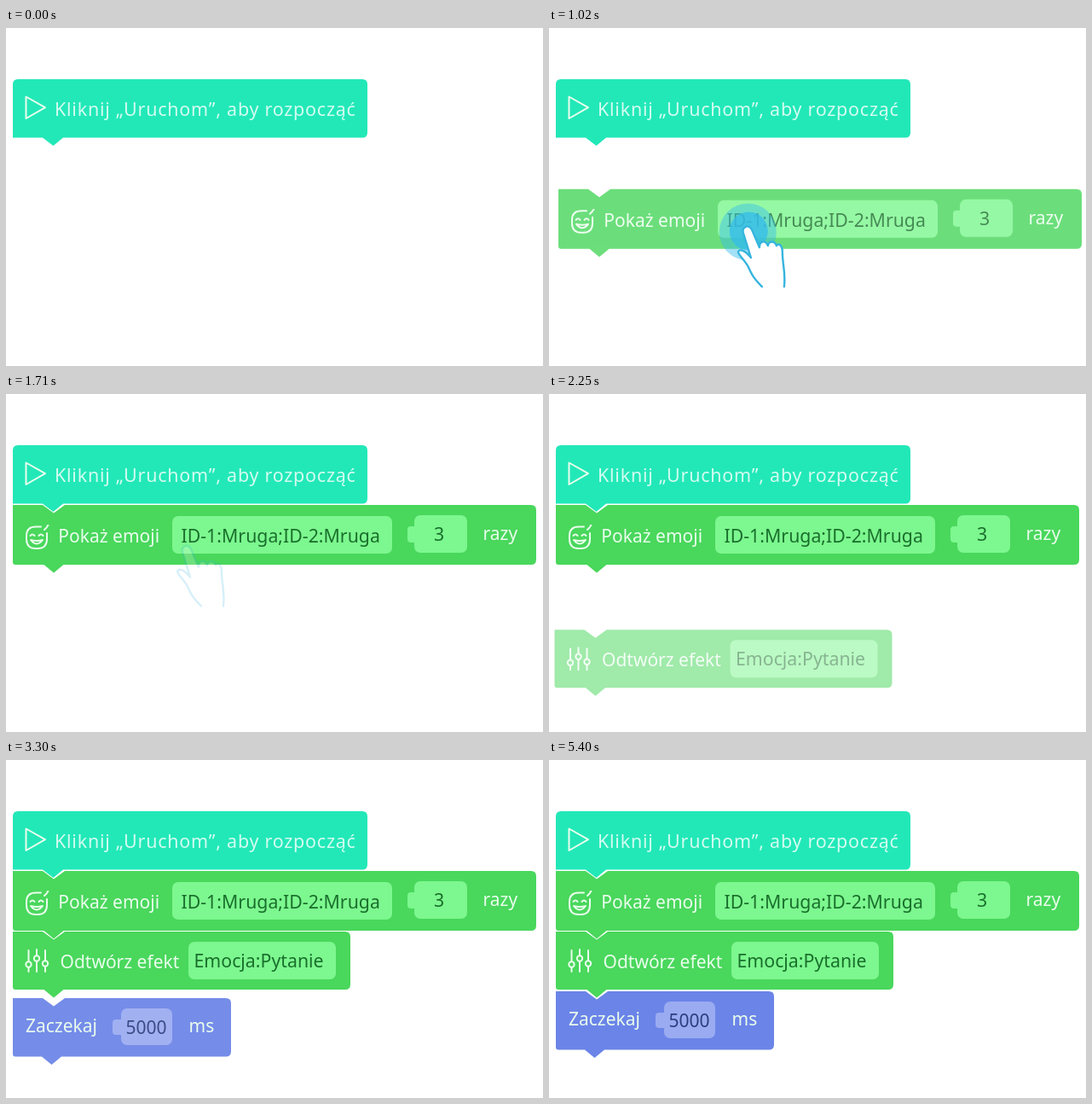
An HTML page for the animation above (5.43 s loop, 630 by 396 pixels).

```html
<!DOCTYPE html>
<html lang="pl">
<head>
<meta charset="utf-8">
<style>
  html, body { margin: 0; width: 100%; height: 100%; overflow: hidden; background: #fff; }
  svg { display: block; width: 630px; height: 396px; }
  text { font: 21px "Noto Sans", "Open Sans", sans-serif; fill: #e9fdec; }
  .title { font-size: 21.5px; letter-spacing: .75px; fill: #d3fbf0; }
  .icon { fill: none; stroke: #e9fdec; stroke-width: 2; stroke-linecap: round; stroke-linejoin: round; }
  .green { fill: #49d75c; }
  .green-field { fill: #7df78f; }
  .dark { font-size: 21.3px; fill: #196f2c; }
  .blue { fill: #6b84e8; }
  .blue-field { fill: #9aabf1; }
  .navy { fill: #2d3d7c; }
</style>
</head>
<body>
<svg viewBox="0 0 630 396">
  <g>
    <path fill="#22e8b8" d="M8 66Q8 60 14 60H418Q424 60 424 66V122.500Q424 128.500 418 128.500H67L55.500 138 43 128.500H8Z"/>
    <path class="icon" d="M23.500 80.500V106L46 93.200Z"/>
    <text class="title" x="57" y="103">Kliknij „Uruchom”, aby rozpocząć</text>
  </g>

  <g id="emoji">
    <path class="green" data-block="8 130 622 200 56"/>
    <g class="icon">
      <path d="M41 155.500H35Q24 155.500 24 166V170Q24 181 35 181H37Q48 181 48 170V163"/>
      <path d="M28.500 166Q31 163 33.500 166M38.500 166Q41 163 43.500 166M29 171Q36 180 43 171Q36 173 29 171"/>
      <path d="M45 159L48 156M48.500 154.500L49.500 154"/>
    </g>
    <text x="61.300" y="174">Pokaż emoji</text>
    <rect class="green-field" x="195" y="143" width="258" height="44" rx="7"/>
    <text class="dark" x="205.500" y="174">ID-1:Mruga;ID-2:Mruga</text>
    <rect class="green-field" x="471" y="155" width="14" height="19" rx="4"/>
    <rect class="green-field" x="479" y="142" width="62" height="44" rx="7"/>
    <text class="dark" x="502" y="172">3</text>
    <text x="559.500" y="171">razy</text>
  </g>

  <g id="effect">
    <path class="green" data-block="8 201 404 269 56"/>
    <g class="icon">
      <path d="M26.500 223V236M26.500 243V248M36 222V229M36 236V248M46 223V235M46 242V248"/>
      <circle cx="26.500" cy="239.500" r="3.200"/>
      <circle cx="36" cy="232.500" r="3.200"/>
      <circle cx="46" cy="238.500" r="3.200"/>
    </g>
    <text x="63.500" y="243.500">Odtwórz efekt</text>
    <rect class="green-field" x="214" y="213" width="173" height="44" rx="7"/>
    <text class="dark" x="220.500" y="242.500">Emocja:Pytanie</text>
  </g>

  <g id="wait">
    <path class="blue" data-block="8 271 264 339.500 53.500"/>
    <text x="23" y="311">Zaczekaj</text>
    <rect class="blue-field" x="125" y="296" width="16" height="18" rx="4"/>
    <rect class="blue-field" x="135" y="283" width="60" height="43" rx="7"/>
    <text class="navy" x="140.500" y="312.500">5000</text>
    <text x="214.500" y="311">ms</text>
  </g>

  <g id="press" fill="#35bdea">
    <circle r="33.500" opacity=".45"/>
    <circle cx="1" cy="-1" r="22.500" opacity=".75"/>
  </g>
  <path id="hand" fill="#fff" stroke="#36b5de" stroke-width="2.400" stroke-linejoin="round" stroke-linecap="round"
    d="M16 68C6 58 4 54 0 45C-4 37 -12 31 -12 27C-10 23 -3 26 3 34L-6 5C-8 -2 0 -6 4 1L13 22C13 14 20 13 23 20C24 14 31 14 33 20C36 16 40 20 40 28C40 42 44 52 42 68"/>
</svg>
<script>
const LOOP = 5430, STEP = 30;
const byId = id => document.getElementById(id);
const ramp = (t, from, to) => Math.min(1, Math.max(0, (t - from) / (to - from)));
const remaining = (t, from, to) => (1 + Math.cos(Math.PI * ramp(t, from, to))) / 2;

// Block outline: notch on top, matching pointer below.
function blockPath(left, top, right, bottom, tip) {
  return `M${left} ${top}H43L56 ${top + 9.5} 69 ${top}H${right - 6}q6 0 6 6V${bottom - 6}q0 6 -6 6` +
    `H${tip + 11.5}L${tip} ${bottom + 9.5} ${tip - 11.5} ${bottom}H${left + 3}q-3 0 -3 -3Z`;
}
document.querySelectorAll('[data-block]').forEach(path =>
  path.setAttribute('d', blockPath(...path.dataset.block.split(' ').map(Number))));

function place(id, x, y, opacity) {
  const node = byId(id);
  node.setAttribute('transform', `translate(${x.toFixed(2)} ${y.toFixed(2)})`);
  node.setAttribute('opacity', opacity.toFixed(3));
}

const blocks = [
  { id: 'emoji', start: 300, end: 1350, solid: 1190, dx: 13.5, dy: 262 },
  { id: 'effect', start: 1790, end: 2840, solid: 2680, dx: -2.5, dy: 126 },
  { id: 'wait', start: 2850, end: 3420, solid: 3335, dx: 0, dy: 76 }
];

function draw(t) {
  for (const { id, start, end, solid, dx, dy } of blocks) {
    const r = remaining(t, start, end);
    place(id, dx * r, dy * r, ramp(t, start, solid));
  }
  const r = remaining(t, 300, 1350);
  const shown = ramp(t, 300, 500);
  place('press', 209 + 108 * r, 180.5 + 260 * r, shown * (1 - ramp(t, 1200, 1450)));
  place('hand', 213 + 93 * r, 180.5 + 243 * r, shown * (1 - ramp(t, 1350, 1800)));
}

const origin = performance.now();
function tick() {
  const t = (performance.now() - origin) % LOOP;
  draw(Math.floor(t / STEP) * STEP);
  requestAnimationFrame(tick);
}
tick();
</script>
</body>
</html>
```
